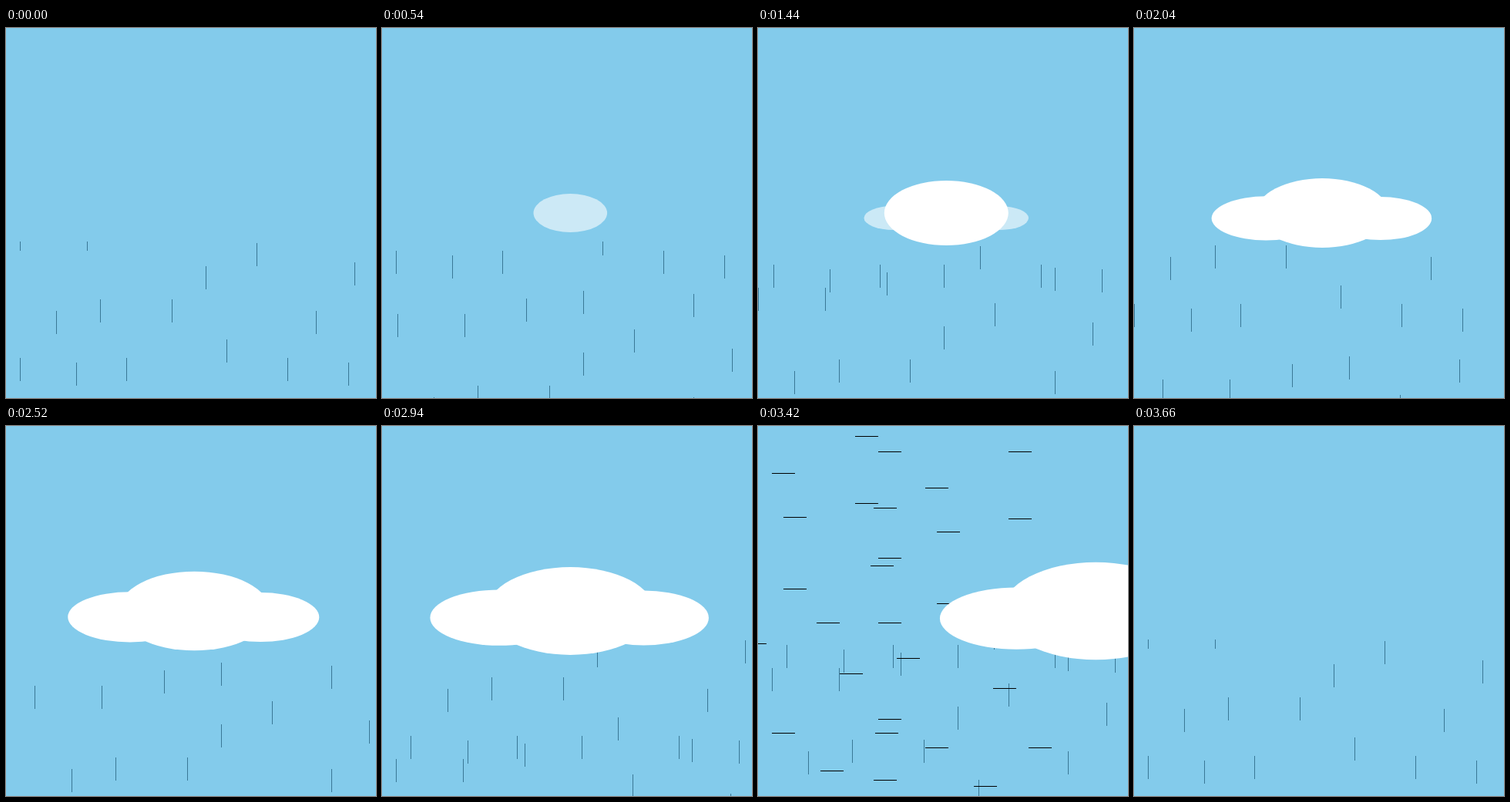
An HTML page with a canvas that plays this animation: 480x480 px, repeating every 3720 ms.

```html
<!DOCTYPE html>
<html>
<head>
<meta charset="utf-8">
<style>
  html, body { margin: 0; width: 100%; height: 100%; overflow: hidden; background: #83cbeb; }
  canvas { display: block; }
</style>
</head>
<body>
<canvas id="stage" width="480" height="480"></canvas>
<script>
const ctx = document.getElementById('stage').getContext('2d');
const LOOP = 3720, STEP = 60, END = 3638;
const QUARTER = END / 4, HALF = END / 2, GUST = 3088;
const SKY = '#83cbeb', RAIN = '#3a7896';
const LENGTH = 30, HORIZON = 277;

// One cluster of strokes; every band holds two clusters.
const strokes = [
  [18.1, 259], [105.1, 259], [325.5, 279], [259.5, 309], [452.1, 304],
  [122.6, 352], [215.5, 352], [65.5, 367], [402.6, 367], [286.5, 404],
  [18.1, 428], [156.1, 428], [365.5, 428], [91.6, 434], [444.1, 434],
  [185.5, 239], [259.5, 229], [402.6, 233]
];
const clusters = [[0, 0], [19.5, -199]];

const clamp = v => Math.max(0, Math.min(1, v));

function eachStroke(draw) {
  for (const [dx, dy] of clusters)
    for (const [x, y] of strokes) draw(x + dx, y + dy);
}

function rainBand(dx, dy) {
  eachStroke((x, y) =>
    ctx.fillRect(Math.floor(x + dx), Math.round(y + dy), 1, LENGTH));
}

function rain(t) {
  ctx.save();
  ctx.beginPath();
  ctx.rect(0, HORIZON, 480, 480 - HORIZON);
  ctx.clip();
  ctx.fillStyle = RAIN;
  if (t < HALF) {
    const rise = -0.2583 * t;
    rainBand(0, rise);
    rainBand(-17.55, rise + 450);
  } else {
    const rise = Math.max(0, 901 - 0.2475 * t);
    rainBand(-17.55, rise - 466);
    rainBand(0, rise);
  }
  ctx.restore();
}

// The rain pattern turned a quarter, rushing to the right.
function wind(t) {
  if (t < GUST) return;
  const shift = 385 + 1.172 * (t - 3420);
  ctx.fillStyle = '#000';
  eachStroke((x, y) =>
    ctx.fillRect(Math.round(shift - y), Math.floor(x - 4.5), LENGTH, 1));
}

function puff(x, y, rx, ry, grow) {
  if (!grow) return;
  ctx.globalAlpha = grow;
  ctx.beginPath();
  ctx.ellipse(x, y, rx * grow, ry * grow, 0, 0, 2 * Math.PI);
  ctx.fill();
  ctx.globalAlpha = 1;
}

function cloud(t) {
  const sides = clamp((t - QUARTER) / QUARTER);
  const scale = 1 + 0.575 * clamp((t - HALF) / HALF);
  ctx.save();
  ctx.translate(244.3 + 0.584 * Math.max(0, t - GUST), 240);
  ctx.scale(scale, scale);
  ctx.fillStyle = '#fff';
  puff(-68.3, 6.4, 66, 26.7, sides);
  puff(70.4, 6.6, 62.2, 26.2, sides);
  puff(0, 0, 80.5, 42, clamp(t / QUARTER));
  ctx.restore();
}

function frame(now) {
  const t = Math.floor((now % LOOP) / STEP) * STEP;
  ctx.fillStyle = SKY;
  ctx.fillRect(0, 0, 480, 480);
  rain(t);
  if (t < END) {
    wind(t);
    cloud(t);
  }
}

const start = performance.now();
function tick() {
  frame(performance.now() - start);
  requestAnimationFrame(tick);
}
tick();
</script>
</body>
</html>
```
